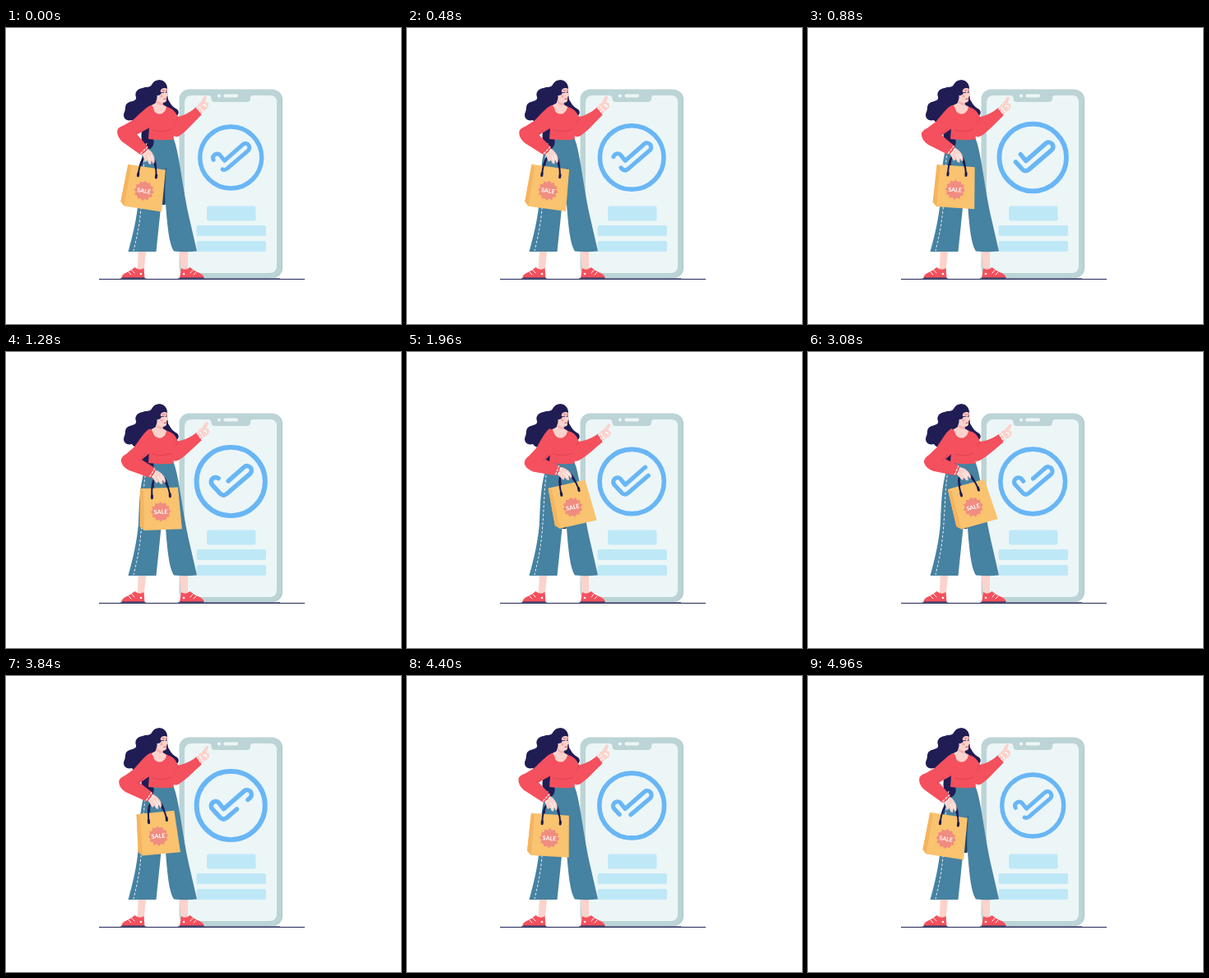
Write an HTML page that moves like this. It is 480 by 360 pixels and loops after 5000 ms.

```html
<!DOCTYPE html>
<html lang="en">
<head>
<meta charset="utf-8">
<title>Shopping checkout</title>
<style>
  html, body { margin: 0; width: 100%; height: 100%; overflow: hidden; background: #fff; }
  svg { display: block; width: 100vw; height: 100vh; }
  .skin { fill: #fbd3cc; }
  .red { fill: #f4505d; }
  .navy { fill: #1f1d54; }
  .line { fill: none; stroke-linecap: round; stroke-linejoin: round; }
  .blue { stroke: #69b6f5; }
  .fold { stroke: #d6404f; stroke-width: .7; }
</style>
</head>
<body>
<svg viewBox="0 0 480 360">
  <!-- phone -->
  <rect x="213" y="75" width="123" height="229" rx="12" fill="#b0cccf"/>
  <rect x="210.500" y="74.500" width="124" height="229" rx="12" fill="#bcd4d6"/>
  <path fill="#ecf6f7" d="M226 82H246Q249.500 82 249.500 85.500Q249.500 90 254 90H292Q297 90 297 85.500Q297 82 300 82H321Q329 82 329 90V289Q329 298 320 298H226Q217 298 217 289V91Q217 82 226 82Z"/>
  <circle cx="259" cy="82.500" r="2" fill="#edf6f7"/>
  <rect x="264.500" y="80.500" width="17.500" height="4" rx="2" fill="#edf6f7"/>
  <g fill="#bfe8f7">
    <rect x="244" y="216.500" width="59.500" height="18" rx="2.500"/>
    <rect x="231.500" y="240" width="84.500" height="13" rx="2.500"/>
    <rect x="231.500" y="259" width="84.500" height="13" rx="2.500"/>
  </g>
  <g id="badge" class="line blue">
    <circle cx="273.200" cy="157.500" r="37.800" stroke-width="5.400"/>
    <path id="tick" pathLength="100" stroke-width="5" stroke-dasharray="87 13"
      d="M252.300 160.800A5 5 0 0 1 259.700 154.200L265.400 161.300L288.300 141.200A5 5 0 0 1 294.700 148.800L268.800 171Q264.800 174.200 261.400 170.800Z"/>
  </g>

  <!-- ground -->
  <path d="M113 305.500H363" stroke="#252858" stroke-width="1"/>
  <path d="M139 305.300H170M209 305.300H333" stroke="#1d2454" stroke-width="1.600"/>

  <!-- back hair -->
  <path class="navy" d="M195 70C191 61 181 62 177 69C175 73 170 71 166 73C159 74 156 79 158 84C159 88 154 89 150 90C143 93 146 98 144 102C141 108 145 114 153 112C156 117 163 117 168 113C165 122 163 132 166 141C169 149 178 147 180 140L200 112C209 108 212 103 208 99C202 96 200 92 197 87Z"/>

  <!-- pointing arm -->
  <g id="point">
    <g id="hand" class="skin">
      <path d="M231.500 101C231 95 233.500 92 236 91L240.500 83.200C241.800 81.200 244.500 82.500 243.700 84.800L241.700 90.500C244.500 89.800 246.300 91.200 245.900 94C246 97 243 99.500 240 101L237 105Z"/>
      <path d="M239.500 93.500Q242 92.500 243 95.500" class="line" stroke="#fff" stroke-width="1.400"/>
    </g>
    <path class="red" d="M196 97C203 98 206 102 209 108C218 106 226 101 231 96L238 105C229 114 220 125 211 131C206 134 202 131 201 126Z"/>
    <path class="line" d="M231.500 97L237.500 104.500M234.500 95.500L240 102" stroke="#fff" stroke-width="1.100" stroke-dasharray="2.500 2"/>
    <path class="line fold" d="M209 108Q209 112 205 115"/>
  </g>

  <!-- legs and shoes -->
  <path class="skin" d="M161 268H170.500L167.500 297H159.500ZM210.500 268H221L221 297H213Z"/>
  <path class="red" d="M140.500 304C140.500 299 146 298 151 295L156.500 291Q162 296 167.500 292L168.500 304Z"/>
  <path class="red" d="M211 304L213 292Q218 296 223.500 291L229 295C234 298 240.500 299 240.500 304Z"/>
  <path class="line" stroke="#fff" stroke-width="1" d="M149 297L152 300M153 294.500L156 298M227 294.500L224 298M231 297L228 300"/>
  <path class="line" stroke="#1d2454" stroke-width="1.200" d="M141 304H168M211 304H240"/>
  <circle cx="164" cy="299" r="1.300" fill="#fff"/><circle cx="216" cy="299" r="1.300" fill="#fff"/>

  <!-- trousers -->
  <path fill="#4682a1" d="M172.500 134H203.500C207 143 209 154 211 166C215 190 218 210 222 228L232 271.500Q218 273 204 271.500C198 262 196 240 194 214H188.500L182.500 272H148.500C154 252 159 232 161 208C162 180 163 152 172.500 134Z"/>
  <path fill="#1f4468" d="M195 169C190 180 188 200 188.500 215H193.500C193 200 193 185 195 169Z"/>
  <path class="navy" d="M169 132H178C182 140 178 147 173 147.500L166 144Z"/>
  <path class="line" d="M171 140C166 160 167 195 163.500 225C161.500 245 158 258 155 271" stroke="#e6f0f4" stroke-width="1" stroke-dasharray="3 2.200" style="stroke-linecap:butt"/>

  <!-- torso and head -->
  <path class="red" d="M176 94C182 92 190 92 196 96C203 98 206 103 206 110L203.500 135.500Q188 137 173 135L174 121L165 106C167 100 171 96 176 94Z"/>
  <path class="line fold" d="M201 123Q190 128 178 124"/>
  <path class="skin" d="M177 94L182 91V82H192L190.500 93L195 96C194 102 190 105 186 104.500C181 104 178 100 177 94Z"/>
  <path fill="#f2b4b0" d="M183 88Q187 92 190.500 91L190.300 94Q185 94 182 90Z"/>
  <path class="skin" d="M183 73C186 69 193 68 195.500 73L195.800 79L197 82.500L195.300 83.500L195 88C194 92 189 91 186 88L182 84Z"/>
  <path class="navy" d="M196 74C196 67 191 62.500 185 63.500C178 64 176 70 176.500 78C177 84 179 86 177 93C182 92 184 87 183.500 82C186 82.500 188.500 81 189 78.500C187 78 187.500 75 190 73.500Q193 72.500 196 74Z"/>
  <path class="line" d="M189 78.500Q190.500 79.300 192 78.200M194 78.300L195.500 78" stroke="#3a214f" stroke-width="1"/>
  <path class="line" d="M190 76L192.500 75.700M194 75.800L195.300 75.800" stroke="#e7545f" stroke-width="1"/>
  <path class="line" d="M192 86.500L194.500 86" stroke="#e34b58" stroke-width="1.100"/>
  <circle cx="189" cy="83" r="1.700" fill="#f7a9a7"/>

  <!-- bag, hung from its handles -->
  <g id="bag">
    <path class="line" d="M-8 18C-9 -7 -5 -9 3 -6C9 -3 11 8 11 16" stroke="#2a2657" stroke-width="1.800"/>
    <path fill="#fac36f" d="M-24 8H22L25 59H-21L-26 54Z"/>
    <path fill="#f5b45f" d="M-24 8L-20 11L-21 59L-26 54Z"/>
    <path class="line" d="M-10 18C-10 -1 -7 -5 -1 -4C7 -3 11 8 12 17" stroke="#1d1b50" stroke-width="2"/>
    <path class="line" d="M-10 17V20M12 16V19" stroke="#1d1b50" stroke-width="3"/>
    <path id="star" fill="#f08d80"/>
    <text x="0" y="39.600" text-anchor="middle" fill="#fff" font-family="Lato, 'Open Sans', sans-serif" font-weight="700" font-size="7.200">SALE</text>
  </g>

  <!-- carrying arm -->
  <g id="arm">
    <g id="fore">
      <path class="skin" d="M164 151L171 146.500C175 148 178 152 179.500 156C181 160 180.500 164 178.500 165.500L176.500 161L175.500 166L173 165L171.500 161L169 163C167 160 167 156 164 151Z"/>
      <path class="line" d="M173 156L175 162M176 155L178 161" stroke="#fff" stroke-width=".9"/>
      <path class="red" d="M135.500 123C134 129 137 134 141 138L163 154C168 153.500 172 149 172.500 145L157 127C150 117 141 116 135.500 123Z"/>
      <path class="line" d="M163.500 152.500L171.500 145M167 153.500L173.500 147.500" stroke="#fff" stroke-width="1.100" stroke-dasharray="2.500 2"/>
    </g>
    <path class="red" d="M177 94C170 96 162 105 154 112L138 121C133 127 137 134 143 136L158 130L173 122C181 114 183 100 177 94Z"/>
    <path class="line fold" d="M157 129Q162 127 165 123"/>
  </g>
</svg>
<script>
const LOOP = 5000, TAU = 2 * Math.PI;
const el = id => document.getElementById(id);
const put = (id, value) => el(id).setAttribute('transform', value);
const wave = (t, lag, period = LOOP) => Math.cos(TAU * (t - lag) / period);

function turn([x, y], [cx, cy], deg) {
  const a = deg * Math.PI / 180, c = Math.cos(a), s = Math.sin(a);
  return [cx + (x - cx) * c - (y - cy) * s, cy + (x - cx) * s + (y - cy) * c];
}

function starPath(cx, cy, outer, inner, points) {
  let d = '';
  for (let i = 0; i < points * 2; i++) {
    const r = i % 2 ? inner : outer, a = i * Math.PI / points;
    d += (i ? 'L' : 'M') + (cx + r * Math.sin(a)).toFixed(2) + ' ' + (cy - r * Math.cos(a)).toFixed(2);
  }
  return d + 'Z';
}
el('star').setAttribute('d', starPath(0, 37, 12.3, 10, 12));

const shoulder = [172, 105], elbow = [145, 128], grip = [173, 161.5];

function draw(t) {
  // circle pulses twice per loop while the gap runs round the tick
  const scale = 1.047 - 0.055 * wave(t, 0, LOOP / 2);
  put('badge', `translate(273.2 157.5) scale(${scale}) translate(-273.2 -157.5)`);
  const gap = 0.94 + 1 - Math.cos(Math.PI * Math.pow(t / LOOP, 1.1));
  el('tick').setAttribute('stroke-dashoffset', -((gap * 100 + 6.5) % 100));

  // arm leads, forearm and bag trail behind
  const swing = -9.2 * (1 - wave(t, -200));
  const bend = -5.4 * (1 - wave(t, 150));
  const tilt = -4.2 + 13.2 * wave(t, 150);
  put('arm', `rotate(${swing} ${shoulder})`);
  put('fore', `rotate(${bend} ${elbow})`);
  const [x, y] = turn(turn(grip, elbow, bend), shoulder, swing);
  put('bag', `translate(${x} ${y}) rotate(${tilt})`);

  const lift = (1 - wave(t, 100)) / 2;
  put('point', `rotate(${7 * lift} 200 108)`);
  put('hand', `rotate(${5 * lift} 236 101)`);
}

const start = performance.now();
function tick() {
  draw((performance.now() - start) % LOOP);
  requestAnimationFrame(tick);
}
tick();
</script>
</body>
</html>
```
